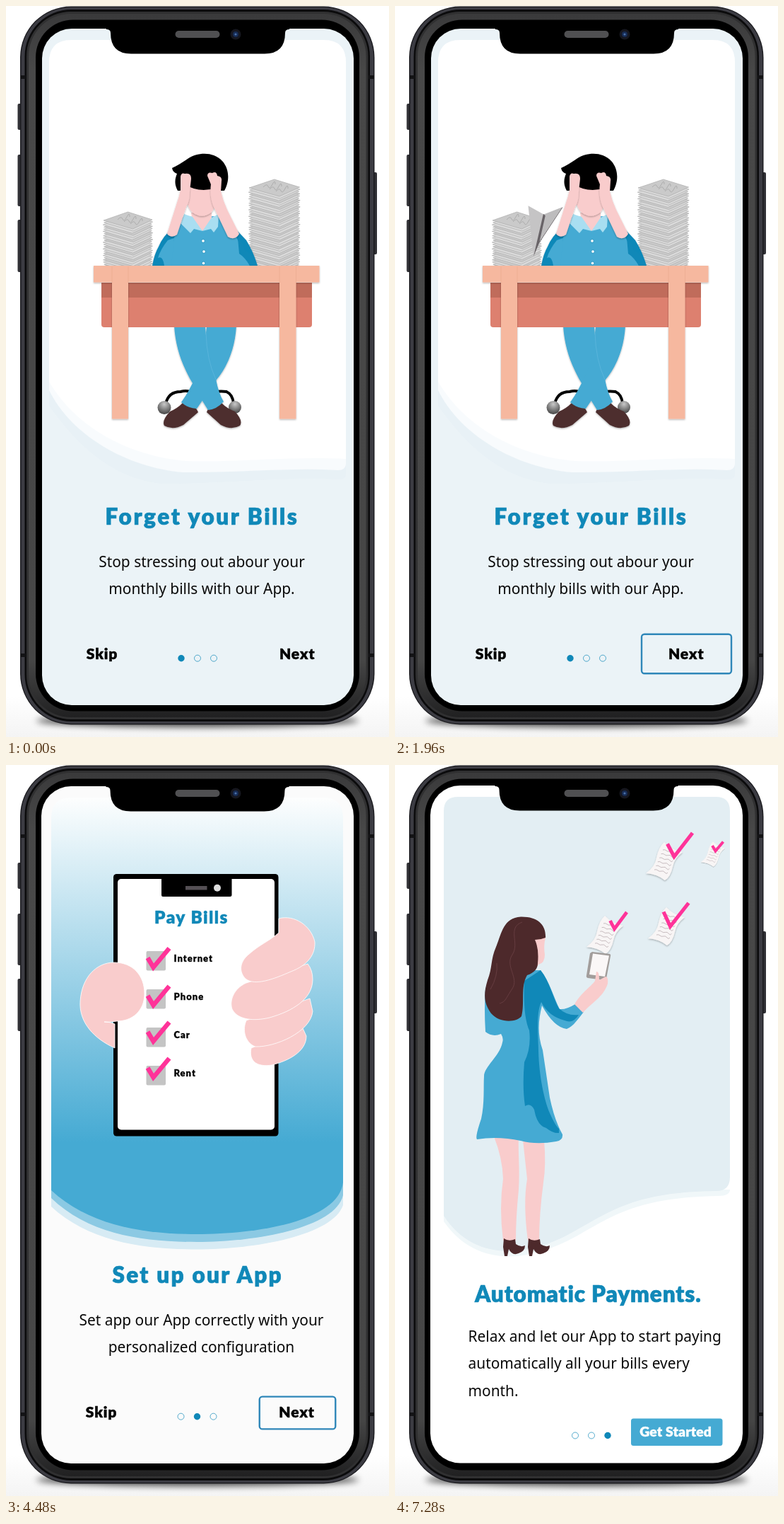
An HTML page for the animation above (9730 ms loop, 542x1033 px).

```html
<!DOCTYPE html>
<html lang="en">
<head>
<meta charset="utf-8">
<title>Bill app onboarding</title>
<style>
html, body { margin: 0; width: 100%; height: 100%; overflow: hidden; background: #fff; }
svg { display: block; width: 100%; height: 100%; }
.bold { font-family: Lato, "Open Sans", sans-serif; font-weight: 900; stroke-linejoin: round; }
.body { font: 20.9px "Noto Sans", "Open Sans", sans-serif; fill: #0a0a0a; }
.tick { fill: none; stroke: #ff3399; }
.ring { fill: none; stroke: #2f87b9; stroke-width: 2.4; }
.skin { fill: #f9cccc; }
.sky { fill: #45aad3; }
.sea { fill: #1088b8; }
.finger { fill: #f9cccc; stroke: #fff; stroke-width: .8; }
</style>
</head>
<body>
<svg viewBox="0 0 542 1033" preserveAspectRatio="none">
  <defs>
    <linearGradient id="floor" x1="0" y1="0" x2="0" y2="1"><stop offset="0" stop-color="#fff"/><stop offset="1" stop-color="#f4f4f4"/></linearGradient>
    <linearGradient id="water" x1="0" y1="0" x2="0" y2="1"><stop offset="0" stop-color="#fdfefe"/><stop offset=".79" stop-color="#45aad3"/></linearGradient>
    <linearGradient id="metal" x1="0" y1="0" x2="0" y2="1"><stop offset="0" stop-color="#3a3a3b"/><stop offset=".08" stop-color="#484848"/><stop offset=".92" stop-color="#464646"/><stop offset="1" stop-color="#202021"/></linearGradient>
    <radialGradient id="ball" cx=".5" cy=".25" r=".8"><stop offset="0" stop-color="#c8c8c8"/><stop offset="1" stop-color="#3c3c3c"/></radialGradient>
    <filter id="blur" x="-20%" y="-200%" width="140%" height="500%"><feGaussianBlur stdDeviation="5"/></filter>
    <filter id="lift" x="-20%" y="-20%" width="140%" height="140%"><feDropShadow dx="0" dy="1.2" stdDeviation="1" flood-opacity=".3"/></filter>
  </defs>

  <rect width="542" height="1033" fill="#fff"/>
  <rect y="975" width="542" height="58" fill="url(#floor)"/>
  <ellipse cx="271" cy="1010" rx="228" ry="9" fill="#000" opacity=".7" filter="url(#blur)"/>
  <g fill="#303035">
    <rect x="16.5" y="138" width="6" height="37" rx="2"/><rect x="16.5" y="210" width="6" height="73" rx="2"/>
    <rect x="16.5" y="302" width="6" height="74" rx="2"/><rect x="519" y="235" width="6" height="116" rx="2"/>
  </g>
  <rect x="20" y=".5" width="501.5" height="1015" rx="72" fill="#1b1b1f"/>
  <rect x="21.5" y="2" width="498.5" height="1012" rx="70" fill="#3c3c43"/>
  <rect x="26.500" y="5" width="488.500" height="1006" rx="66" fill="#0b0b0c"/>
  <rect x="29" y="8" width="483.5" height="1000" rx="63" fill="#303031"/>
  <rect x="32" y="11" width="477.5" height="994" rx="60" fill="url(#metal)"/>
  <rect x="42" y="19.5" width="458" height="977" rx="53" fill="#000"/>
  <path d="M21 100.500h7M513 100.500h8M21 917.500h7M513 917.500h8" stroke="#131315" stroke-width="5"/>
  <rect id="glass" rx="42"/>

  <g id="scene0">
    <path fill="#e8f1f6" d="M61 80Q61 48 93 48H449Q481 48 481 80V660Q482 670 470 669C390 665 300 676 220 675C150 668 100 620 61 565Z"/>
    <path fill="#f8fbfd" d="M61 80Q61 48 93 48H449Q481 48 481 80V646Q481 656 470 656C400 652 330 660 250 659C170 652 92 606 61 543Z"/>
    <path fill="#fff" d="M61 80Q61 48 93 48H449Q481 48 481 80V640C400 636 330 645 255 643C175 636 100 597 61 531Z"/>
    <g id="piles"></g>
    <g filter="url(#lift)">
      <path class="sea" d="M236 314Q222 325 216 340Q210 350 207 367H235L245 322ZM324 314L340 331Q350 347 356 367H327L314 325Z"/>
      <path class="sky" d="M250 298L300 297L322 318C329 335 340 350 345 367H230L240 318Z"/>
    </g>
    <path class="sky" d="M229 331Q219 343 215 356Q222 352 224 367H234L238 328Z"/>
    <path class="sea" d="M328 328Q336 334 338 345Q347 349 354 364L353 367H345Q338 355 330 350Z"/>
    <path class="skin" d="M262 292L291 292L291 305L278 318L264 305Z"/>
    <path fill="#a9def1" d="M252 294L264 298L278 318L266 315L261 321L247 307ZM301 294L291 299L278 318L290 315L294 320L300 312Z"/>
    <path class="sky" d="M277 318h3v49h-3z"/>
    <g fill="#fff" stroke="#1088b8" stroke-width=".7"><circle cx="279" cy="332" r="2.3"/><circle cx="280" cy="347" r="2.3"/><circle cx="279.500" cy="363.500" r="2.3"/></g>
    <path d="M235 229C243 225 250 221 257 216C272 206 294 206 306 219C316 230 317 247 309 261H243C237 250 240 242 242 237Q236 235 235 229Z"/>
    <path class="skin" filter="url(#lift)" d="M254 252Q272 265 299 257Q299 284 290 292Q277 302 263 291Q253 280 254 252Z"/>
    <g class="skin" filter="url(#lift)">
      <path d="M247 241Q248 235 253 237Q262 235 262 244L260 262Q260 276 255 284L242 323Q234 329 228 322L241 281Q245 270 247 260Z"/>
      <path d="M285 240Q285 234 292 236Q298 233 299 240Q306 241 305 247L304 262Q307 275 313 288L330 322Q324 332 314 326L293 282Q288 268 290 252Z"/>
    </g>
    <path fill="none" stroke="#050505" stroke-width="4" d="M226 562Q230 545 247 545Q258 542 266 548M288 548Q298 543 312 545Q321 549 322 562"/>
    <circle cx="224" cy="567.500" r="9.500" fill="url(#ball)"/><circle cx="324" cy="567" r="9" fill="url(#ball)"/>
    <g filter="url(#lift)">
      <path fill="#4d2f2f" d="M250 561Q267 562 272 574L251 592Q236 600 224 593Q220 586 232 573Q242 569 250 561Z"/>
      <path fill="#4d2f2f" d="M305 561Q288 562 284 574L304 592Q319 600 331 593Q336 586 324 573Q313 569 305 561Z"/>
      <path class="sky" d="M238 452H282Q284 495 297 527Q301 548 308 559Q298 570 286 571Q274 553 264 533C251 511 240 485 238 452Z"/>
      <path class="sky" d="M284 452H326C324 485 313 510 298 528L270 569Q256 568 248 560Q258 546 264 533Q280 505 284 452Z"/>
    </g>
    <path fill="none" stroke="#66bbdf" stroke-width=".6" d="M283 462Q284 500 297 528"/>
    <path fill="#dd806f" d="M135 391H433V450Q433 454 429 454H139Q135 454 135 450Z"/>
    <path fill="#c06c5b" d="M135 391H433V412H135Z"/>
    <g fill="#f6b89f" filter="url(#lift)"><rect x="124" y="367" width="319.500" height="23.500"/><rect x="150" y="368" width="23" height="215.500"/><rect x="387" y="368" width="23.500" height="215.500"/></g>
    <path fill="none" stroke="#eaa98f" stroke-width=".6" d="M150 368v23M173 368v23M387 368v23M410.500 368v23"/>
  </g>

  <g id="scene1">
    <path fill="#d7ebf4" d="M64 500V624C118 674 195 684.500 270 684.500C355 684.500 463 664 477 622V500Z"/>
    <path fill="#8bc9e3" d="M64 500V612C118 664 195 674 270 674C355 674 466 654 477 608V500Z"/>
    <path fill="url(#water)" d="M64 75Q64 46 92 46H449Q477 46 477 75V590C470 645 355 663 270 663C195 663 118 651 64 601Z"/>
    <rect x="152" y="154" width="233.500" height="370.500" rx="4.500"/>
    <rect x="158" y="161" width="222" height="354.500" rx="5" fill="#fff"/>
    <path d="M220 160H319.500V184Q319.500 186 317 186H222Q220 186 220 184Z"/>
    <rect x="254" y="171" width="30.500" height="5.500" fill="#555055"/><circle cx="299" cy="173.700" r="5" fill="#dedede"/>
    <g id="list"></g>
    <path class="finger" d="M154 400C125 387 103 364 105 334C107 300 128 279 153 279C180 279 196 298 196 323C196 348 178 362 157 362Q146 364 139 363Q148 363 154 366Z"/>
    <path class="finger" d="M347 400C343 420 357 427 376 424C400 418 425 405 425 383L420 372Z"/>
    <path class="finger" d="M340 361C333 378 341 394 353 398C380 399 431 378 434 348L430 330Z"/>
    <path class="finger" d="M340 308C322 316 316 333 320 345C328 361 352 362 373 357C405 348 434 331 434 303Q434 290 427 281Z"/>
    <path class="finger" d="M386 217C408 211 432 227 437 250C438 268 427 283 403 292C380 302 352 313 339 302C329 292 331 278 343 268C360 253 371 250 386 237Z"/>
  </g>

  <g id="scene2">
    <path fill="#f0f7f9" d="M69 600H474Q474 609 457 609C345 611 310 636 260 664C190 704 115 711 69 645Z"/>
    <path fill="#e3eef3" d="M69 65Q69 45 89 45H454Q474 45 474 65V582Q474 602 455 602C342 603 306 630 257 657C192 696 112 704 69 637Z"/>
    <g id="sheets"></g>
    <path class="skin" d="M140 525H175C174 550 177 570 175 600Q171 640 171 672H153Q147 625 153 585Q152 555 140 525ZM181 530H211Q214 565 210 590Q204 635 204 672H188Q181 620 187 585Z"/>
    <path id="boot" fill="#4d292b" d="M154 669Q161 674 170 670L171 677Q178 682 184 679Q184 687 175 690Q166 694 161 684L159 694H155L153 681Z"/>
    <use href="#boot" x="35"/>
    <path class="skin" d="M198 244H213Q210 255 212 268Q212 280 203 282L198 290Z"/>
    <path class="sky" d="M206 290C219 306 225 330 233 345Q242 346 255 338L267 349C258 360 252 370 243 373Q225 371 208 340C203 360 201 380 209 403L219 470Q226 503 237 522Q238 530 228 532Q200 537 178 531Q145 524 116 529Q113 526 122 500C127 478 125 455 126 440C126 426 148 412 152 392Q154 386 150 380Q138 385 128 377Q126 345 128 315L170 290Z"/>
    <path class="sea" d="M183 305L206 290C219 306 223 328 232 344Q244 355 260 353Q252 366 240 361Q217 355 207 335C199 352 203 385 203 405C204 440 211 473 219 492Q227 510 232 514V520Q224 521 214 513Q201 510 197 487Q192 477 184 482Q180 455 183 420Q193 400 190 375Q181 355 183 305Z"/>
    <path fill="#4d292b" d="M213 244C214 226 202 214 178 214.500C153 216 151 238 143 257C135 275 138 287 131 304C124 327 127 338 136 351C148 365 172 364 179 355C184 336 177 314 187 297Q202 292 202 280Q204 260 198 247Q206 247 213 244Z"/>
    <path fill="none" stroke="#70464a" stroke-width=".7" d="M180 222C158 230 177 252 166 268S176 301 166 316S157 334 148 337M135 317Q146 298 144 280"/>
    <path fill="#a29d9b" d="M279 264L304 267Q306 268 305 270L299 302Q298 304 296 304L273 301Q270 300 271 297L276 266Z"/>
    <path fill="#faf7f7" d="M280 266.500L303 269.500L297 299L275 296Z"/>
    <path class="skin" d="M254 338C265 320 279 312 283 305L285 292Q289 291 289 304L298 299Q302 299 301 309C295 328 279 335 266 350Z"/>
    <rect x="334" y="923.500" width="129.500" height="38.500" rx="3.500" class="sky"/>
  </g>

  <g id="words"></g>
  <path id="notch" d="M142 27H401V33Q395 33 395 38Q395 67.500 366 67.500H177Q148 67.500 148 38Q148 33 142 33Z"/>
  <rect x="239.500" y="35" width="63" height="10" rx="5" fill="#505052"/>
  <circle cx="325" cy="40" r="7.500" fill="#16171f"/><circle cx="325" cy="40" r="4" fill="#172c55"/><circle cx="325" cy="40" r="1.600" fill="#4a70a8"/>
  <rect id="ring" class="ring" rx="4"/>
  <g id="plane">
    <path fill="#c5c4c5" d="M0 0L41 -71L53 -45Z"/>
    <path fill="#bdbcbd" d="M20 -13L53 -45L84 -37Z"/>
    <path fill="#686367" d="M0 0L53 -46L54 -42L20 -12Z"/>
    <path fill="none" stroke="#6d686b" d="M20 -12.500L84 -36.500"/>
  </g>
</svg>
<script>
const LOOP = 9730, STEP = 70, CUTS = [0, 2450, 5250];
const $ = id => document.getElementById(id);
const clamp = v => Math.max(0, Math.min(1, v));
const easeOut = (p, n) => 1 - (1 - clamp(p)) ** n;

function add(parent, tag, attrs, text) {
  const el = document.createElementNS('http://www.w3.org/2000/svg', tag);
  set(el, attrs);
  if (text) el.textContent = text;
  return parent.appendChild(el);
}
function set(el, attrs) { for (const k in attrs) el.setAttribute(k, attrs[k]); }
function show(el, on) { el.style.display = on ? '' : 'none'; }

function bold(g, text, x, y, size, color, gap, anchor = 'middle') {
  add(g, 'text', { class: 'bold', x, y, 'font-size': size, fill: color, stroke: color,
    'stroke-width': size * .022, 'letter-spacing': gap, 'text-anchor': anchor }, text);
}

function dots(g, x, y, active) {
  for (let i = 0; i < 3; i++) {
    add(g, 'circle', { cx: x + i * 23, cy: y, r: i === active ? 4.7 : 4.5,
      fill: i === active ? '#1088b8' : 'none', stroke: '#1088b8', 'stroke-width': i === active ? 0 : .7 });
  }
}

// Stacks of paper, drawn from the bottom sheet up
function pile(x, top, w, count) {
  const g = $('piles');
  for (let i = count; i >= 0; i--) {
    const y = top + i * 3.1, j = i ? Math.sin(i * 2.3) * .8 : 0;
    add(g, 'path', { d: `M${x + j} ${y + 12}L${x + w * .5 + j} ${y}L${x + w + j} ${y + 11}L${x + w * .6 + j} ${y + 24}Z`,
      fill: i % 3 ? '#dadada' : '#cacaca', stroke: '#adadad', 'stroke-width': .7 });
  }
  for (let i = 0; i < 3; i++) {
    add(g, 'path', { d: `M${x + 20 + i * 9} ${top + 11 + i * 3}q5 -6 7 -1t6 -3t4 0`,
      fill: 'none', stroke: '#aaa', 'stroke-width': .9 });
  }
}
pile(138, 291, 69, 22);
pile(344, 245, 71.5, 37);

// Flying bills
const tick = (g, pts, width) => add(g, 'polyline', { class: 'tick', points: pts, 'stroke-width': width });
for (const [x, y, s] of [[297, 240, 1], [384, 228, 1], [381, 136, 1], [450, 126, .66]]) {
  const g = add($('sheets'), 'g', { transform: `translate(${x} ${y}) scale(${s})`, filter: 'url(#lift)' });
  add(g, 'path', { fill: '#f8f5f5', d: 'M0 -27Q10 -16 26 -13Q14 -4 12 8Q9 22 1 27Q-10 18 -26 17Q-13 8 -11 -5Q-8 -20 0 -27Z' });
  for (let i = 0; i < 6; i++) {
    add(g, 'path', { d: `M${-2 - i * 2.4} ${-16 + i * 5.6}q3 -1 5 1t5 1t5 2t4 0`,
      fill: 'none', stroke: '#b0a2a6', 'stroke-width': .7 });
  }
}
const paid = [
  [5950, '304.5,220 310.5,231.500 328,208', 4.8],
  [6300, '380,207.500 389.500,228 415.500,195', 5.2],
  [6580, '385.500,111.500 395,129.500 421,96', 5.2],
  [6860, '449,114 453.500,121.500 464.500,108.500', 4]
].map(([at, pts, w]) => ({ at, el: tick($('scene2'), pts, w) }));

// Checklist
const list = $('list');
bold(list, 'Pay Bills', 262.5, 223.5, 24.3, '#1088b8', 1.5);
const rows = ['Internet', 'Phone', 'Car', 'Rent'];
rows.forEach((name, i) => {
  add(list, 'rect', { x: 198.5, y: 263 + i * 54, width: 27.5, height: 27.5, rx: 2, fill: '#c4c4c4' });
  bold(list, name, 237.5, 278 + i * 54, 13, '#000', 1, 'start');
});
const ticks = rows.map(() => tick(list, '200.500,272.500 208.500,286 231,259', 6.5));

// Captions
const captions = [0, 1, 2].map(() => add($('words'), 'g', {}));
function caption(i, title, x, y, gap, lines, bx, by, anchor) {
  bold(captions[i], title, x, y, 31.5, '#1088b8', gap);
  lines.forEach((s, k) => add(captions[i], 'text', { class: 'body', x: bx, y: by + k * 38.4, 'text-anchor': anchor }, s));
}
caption(0, 'Forget your Bills', 277.5, 733, 2.6, ['Stop stressing out abour your', 'monthly bills with our App.'], 277, 793, 'middle');
caption(1, 'Set up our App', 271.2, 732, 2.3, ['Set app our App correctly with your', 'personalized configuration'], 276.5, 791.8, 'middle');
caption(2, 'Automatic Payments.', 273.3, 759, .9, ['Relax and let our App to start paying', 'automatically all your bills every', 'month.'], 103.5, 815, 'start');
for (const i of [0, 1]) {
  bold(captions[i], 'Skip', 136 - i, 922.5 - i, 21, '#000', .9);
  bold(captions[i], 'Next', 412.2 - i * .6, 922.5 - i, 21, '#000', 1);
  dots(captions[i], 248 - i * .5, 921.7 - i, i);
}
dots(captions[2], 255, 947.5, 2);
bold(captions[2], 'Get Started', 397.2, 948.5, 19.3, '#fff', .2);

// Plane keys: time, nose x, nose y, turn, scale
const keys = [[70, 442, 129, 0, 1], [700, 263, 181, 0, 1], [980, 150, 219, -10, .97], [1400, 172, 306, -24.5, .92], [1960, 196, 354, -36, .88]];
const slope = (a, b, c) => (b[c] - a[c]) / (b[0] - a[0]);
function flight(t, c) {
  const last = keys.length - 1;
  if (t >= keys[last][0]) return keys[last][c];
  const i = keys.findIndex((k, n) => n < last && t < keys[n + 1][0]);
  const a = keys[i], b = keys[i + 1], d = b[0] - a[0], u = (t - a[0]) / d;
  const ma = slope(i ? keys[i - 1] : a, b, c);
  const mb = i + 1 < last ? slope(a, keys[i + 2], c) : 0;
  return a[c] * (1 + 2 * u) * (1 - u) ** 2 + d * ma * u * (1 - u) ** 2
    + b[c] * u * u * (3 - 2 * u) + d * mb * u * u * (u - 1);
}

function frameRing(cx, cy, w, h) {
  set($('ring'), { x: cx - w, y: cy - h, width: 2 * w, height: 2 * h });
}

function draw(t) {
  const scene = t < CUTS[1] ? 0 : t < CUTS[2] ? 1 : 2;
  [0, 1, 2].forEach(i => {
    show($('scene' + i), i === scene);
    show(captions[i], i === scene);
  });
  set($('glass'), { x: scene ? 50 : 51, y: [32, 30, 29][scene], width: scene ? 442 : 441,
    height: [956, 957, 957.5][scene], fill: ['#ebf3f7', '#fbfbfb', '#fff'][scene] });
  set($('notch'), { transform: `translate(${scene ? -.5 : 0} ${[0, -2, -3][scene]})` });

  show($('plane'), scene === 0 && t >= 70);
  if (scene === 0 && t >= 70) {
    const [x, y, turn, size] = [1, 2, 3, 4].map(c => flight(t, c));
    set($('plane'), { transform: `translate(${x} ${y}) rotate(${turn}) scale(${size})` });
  }

  ticks.forEach((el, i) => {
    const p = (t - 2490 - i * 472) / 472;
    show(el, p > 0);
    set(el, { transform: `translate(0 ${[0, 53.5, 104.5, 155.5][i] - 34 * (1 - easeOut(p, 2))})`, opacity: clamp(p * 3) });
  });
  paid.forEach(p => show(p.el, t >= p.at));

  const start = [1290, 4335, 6860][scene];
  show($('ring'), t >= start && t < 7280);
  if (scene < 2) {
    const w = 45.5 + 18 * easeOut((t - start) / 690, 2.6);
    frameRing(412.5, 915.5, w, 22 + (w - 52) * .5);
  } else {
    const grow = 4 + 6 * clamp((t - start) / 210);
    frameRing(398.7, 942.8, 64.5 + grow, 19.2 + grow);
  }
}

const begin = performance.now();
function loop(now) {
  const t = Math.max(0, now - begin) % LOOP;
  draw(Math.floor(t / STEP) * STEP);
  requestAnimationFrame(loop);
}
draw(0);
requestAnimationFrame(loop);
</script>
</body>
</html>
```
